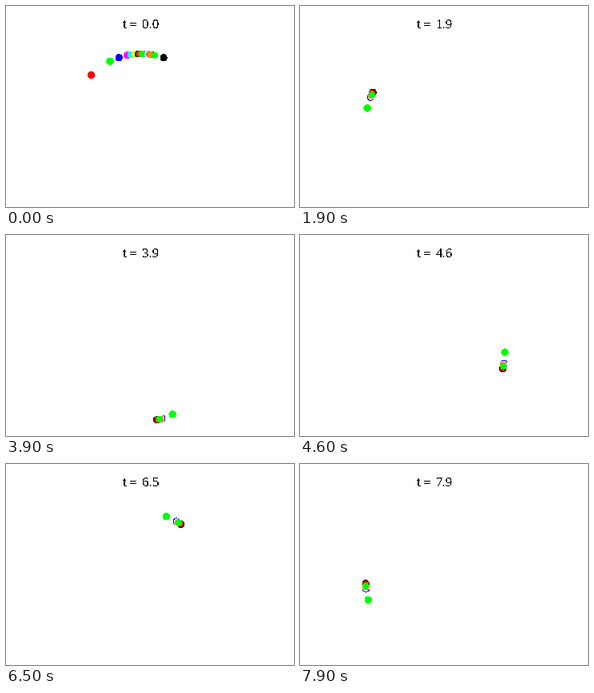
A matplotlib script for the animation above (8 s loop, 360 px wide and 252 px high).

```python
import matplotlib.pyplot as plt
import numpy as np
from matplotlib.animation import FuncAnimation

W, H, DPI = 360, 252, 72
FRAMES, STEP_MS = 80, 100
CENTER, RADIUS = (169, 147), 87
START, SPEED = 86.7, 604.7  # common phase in degrees, degrees per second
DECAY = 20.0                # how fast the phases lock

# colour, phase at t = 0, offset from the common phase once locked; back to front
DOTS = [
    ("#00ff00", 116.6, 11.7),
    ("#ff0000", 135.9, -1.4),
    ("#0000ff", 108.7, 2.3),
    ("#000000", 71.2, -2.1),
    ("#ff00ff", 101.6, 0.8),
    ("#00ffff", 98.5, 0.4),
    ("#ffff00", 95.0, 1.2),
    ("#000000", 92.5, -1.8),
    ("#a020f0", 88.0, 0.2),
    ("#40a0ff", 86.5, 0.0),
    ("#f0f0f0", 84.8, 1.7),
    ("#808080", 83.2, -0.8),
    ("#b00000", 81.2, -1.7),
    ("#ff4040", 91.2, -0.6),
    ("#ff8c00", 82.3, 0.9),
    ("#d04000", 90.6, -0.5),
    ("#00ff00", 78.7, 0.1),
    ("#00ff00", 89.5, 0.0),
]
colors = [d[0] for d in DOTS]
first = np.array([d[1] for d in DOTS])
locked = np.array([d[2] for d in DOTS])
diameters = np.linspace(8.3, 6.8, len(DOTS))


def positions(t):
    spread = locked + (first - START - locked) * np.exp(-DECAY * t)
    phase = np.radians(START + SPEED * t + spread)
    return np.column_stack((CENTER[0] + RADIUS * np.cos(phase),
                            CENTER[1] - RADIUS * np.sin(phase)))


fig = plt.figure(figsize=(W / DPI, H / DPI), dpi=DPI, facecolor="white")
ax = fig.add_axes((0, 0, 1, 1))
ax.set_xlim(0, W)
ax.set_ylim(H, 0)
ax.axis("off")


def write(x, text):
    return ax.text(x, 28.3, text, fontsize=17, family="Liberation Serif",
                   ha="left", va="baseline", antialiased=False)


dots = ax.scatter(*positions(0).T, s=diameters ** 2, c=colors, linewidths=0,
                  antialiased=False)
write(146, "t")
write(154, "=")
label = write(170, "")


def update(frame):
    t = frame * STEP_MS / 1000
    dots.set_offsets(positions(t))
    label.set_text(f"{t:.1f}")
    return dots, label


anim = FuncAnimation(fig, update, frames=FRAMES, interval=STEP_MS,
                     repeat=True, repeat_delay=0)
plt.show()
```
